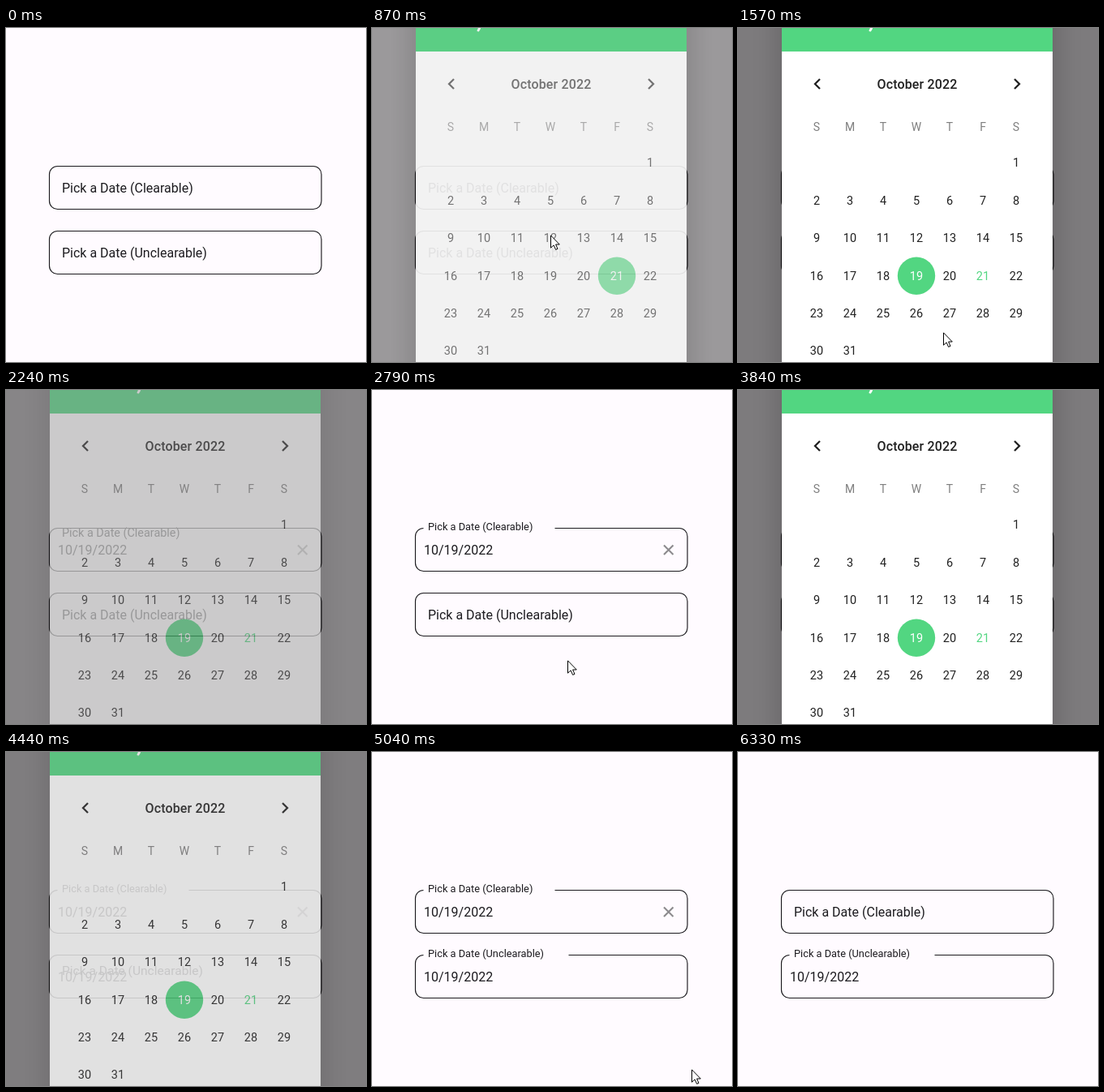
An HTML page that plays this animation: 444x412 px, repeating every 6670 ms.

```html
<!DOCTYPE html>
<html lang="en">
<head>
<meta charset="utf-8">
<title>Date picker fields</title>
<style>
  html, body { margin: 0; width: 100%; height: 100%; overflow: hidden; background: #fffbff; }
  svg { display: block; width: 444px; height: 412px; font: 16px Roboto, sans-serif; fill: #1c1b1f; }
  .outline { fill: none; stroke: #1c1b1f; stroke-width: 1.15; }
  .clear { fill: none; stroke: #8c8a8d; stroke-width: 2.1; }
  .month { font-weight: 500; letter-spacing: .15px; }
  .arrow { fill: none; stroke: #212121; stroke-width: 2.3; }
  #calendar { fill: #212121; text-anchor: middle; }
  #grid { font-size: 14.5px; }
  #heading { font-size: 38px; fill: #fff; }
  .weekday { font-size: 14px; fill: #000; fill-opacity: .5; }
</style>
</head>
<body>
<svg viewBox="0 0 444 412">
  <defs>
    <filter id="blur" x="-30%" y="-30%" width="160%" height="160%">
      <feGaussianBlur stdDeviation="16"/>
    </filter>
  </defs>
  <g id="fields"></g>
  <rect id="scrim" width="444" height="412" fill="#000"/>
  <g id="dialog">
    <rect x="48" y="-80" width="346" height="600" fill="#000" opacity=".16" filter="url(#blur)"/>
    <rect x="54" y="-80" width="334" height="600" fill="#fff"/>
    <rect x="54" y="-80" width="334" height="109" fill="#52d681"/>
    <text id="heading" x="86" y="-1"></text>
    <g id="calendar">
      <path class="arrow" d="M101 63L95 69L101 75M341 63L347 69L341 75"/>
      <text class="month" x="221" y="74.5">October 2022</text>
      <circle id="mark" cy="305.7" r="23.2" fill="#52d681"/>
      <g id="grid"></g>
    </g>
  </g>
  <path id="cursor" d="M.5 .9V16.2L4.1 12.9L6.6 18.4L9 17.4L6.6 12H11.3Z" fill="#fff" stroke="#000"/>
</svg>
<script>
const LOOP = 6670, STEP = 68;
const INK = '#212121', GREEN = '#52d681';
const $ = id => document.getElementById(id);

function add(parent, tag, attrs, text = '') {
  const el = document.createElementNS('http://www.w3.org/2000/svg', tag);
  for (const name in attrs) el.setAttribute(name, attrs[name]);
  el.textContent = text;
  return parent.appendChild(el);
}

const show = (el, on) => el.setAttribute('visibility', on ? 'visible' : 'hidden');

// Progress from 0 to 1 over a span of time, and two easings
const span = (t, start, length) => Math.min(1, Math.max(0, (t - start) / length));
const easeOut = u => 1 - (1 - u) ** 2;
const easeInOut = u => u * u * (3 - 2 * u);

// Each time the dialog is used
const sessions = [
  { open: 800, fade: 728, pick: 1490, close: 2175 },
  { open: 3084, fade: 3066, pick: 3560, close: 4383 }
];

// Pointer moves: start, duration, destination; it waits below the stage
const home = { x: 385, y: 430 };
const moves = [
  { start: -105, length: 700, x: 172, y: 180 },
  { start: 740, length: 140, x: 220, y: 255 },
  { start: 890, length: 380, x: 222, y: 302 },
  { start: 1480, length: 150, x: 275, y: 425 },
  { start: 2450, length: 540, x: 226, y: 291 },
  { start: 3660, length: 150, x: 310, y: 425 },
  { start: 4600, length: 100, x: 400, y: 425 },
  { start: 4893, length: 560, x: 361, y: 202 },
  { start: 5860, length: 440, x: 440, y: 425 }
];

function pointer(t) {
  return moves.reduce((p, m) => {
    const u = easeInOut(span(t, m.start, m.length));
    return { x: p.x + (m.x - p.x) * u, y: p.y + (m.y - p.y) * u };
  }, home);
}

function makeField(title, top, width) {
  const g = add($('fields'), 'g', { transform: `translate(0 ${top})` });
  const outline = add(g, 'path', { class: 'outline' });
  const label = add(g, 'text', { x: 69 }, title);
  const date = add(g, 'text', { x: 64, y: 33 }, '10/19/2022');
  return (lift, filled) => {
    const from = lift === 1 ? 63.5 + width : 63.5;
    outline.setAttribute('d', `M${from} .5H379a10 10 0 0 1 10 10V43.5a10 10 0 0 1 -10 10H63.5a10 10 0 0 1 -10 -10V10.5a10 10 0 0 1 10 -10`);
    label.setAttribute('y', 33 - 30 * easeOut(lift));
    label.style.fontSize = 16 - 3.2 * lift + 'px';
    show(date, filled);
  };
}

const first = makeField('Pick a Date (Clearable)', 170, 162);
const second = makeField('Pick a Date (Unclearable)', 250, 179);
const clear = add($('fields'), 'path', { class: 'clear', d: 'M360 191.5L371.5 203M371.5 191.5L360 203' });

const column = i => 97 + 41 * i;
[...'SMTWTFS'].forEach((d, i) => add($('grid'), 'text', { class: 'weekday', x: column(i), y: 127 }, d));
const days = [];
for (let d = 1; d <= 31; d++) {
  const cell = d + 5;
  days[d] = add($('grid'), 'text', { x: column(cell % 7), y: 171.4 + 46.4 * Math.floor(cell / 7) }, d);
}

function drawDialog(t) {
  const s = t < 2800 ? sessions[0] : sessions[1];
  const closing = t > s.close;
  const alpha = closing ? 1 - span(t, s.close, 160) : easeOut(span(t, s.open, 130));
  const dim = closing ? 1 - (1 - alpha) ** 3 : alpha ** 2;
  $('dialog').setAttribute('opacity', alpha);
  $('scrim').setAttribute('opacity', .51 * dim);
  $('calendar').setAttribute('opacity', span(t, s.fade, 240));

  const picked = t >= s.pick;
  $('heading').textContent = picked ? 'Wed, Oct 19' : 'Fri, Oct 21';
  $('mark').setAttribute('cx', column(picked ? 3 : 5));
  days[19].setAttribute('fill', picked ? '#fff' : INK);
  days[21].setAttribute('fill', picked ? GREEN : '#fff');
}

function draw(t) {
  const filled = t >= 2200 && t < 5780;
  first(span(t, 2169, 150) - span(t, 5740, 150), filled);
  second(span(t, 4399, 150), t >= 4400);
  show(clear, filled);
  drawDialog(t);
  const p = pointer(t);
  $('cursor').setAttribute('transform', `translate(${Math.round(p.x)} ${Math.round(p.y)})`);
}

// The picture advances in even steps, as a screen recording does
const begin = performance.now();
function loop() {
  const t = (performance.now() - begin) % LOOP;
  draw(Math.floor((t + 14) / STEP) * STEP);
  requestAnimationFrame(loop);
}
loop();
</script>
</body>
</html>
```
